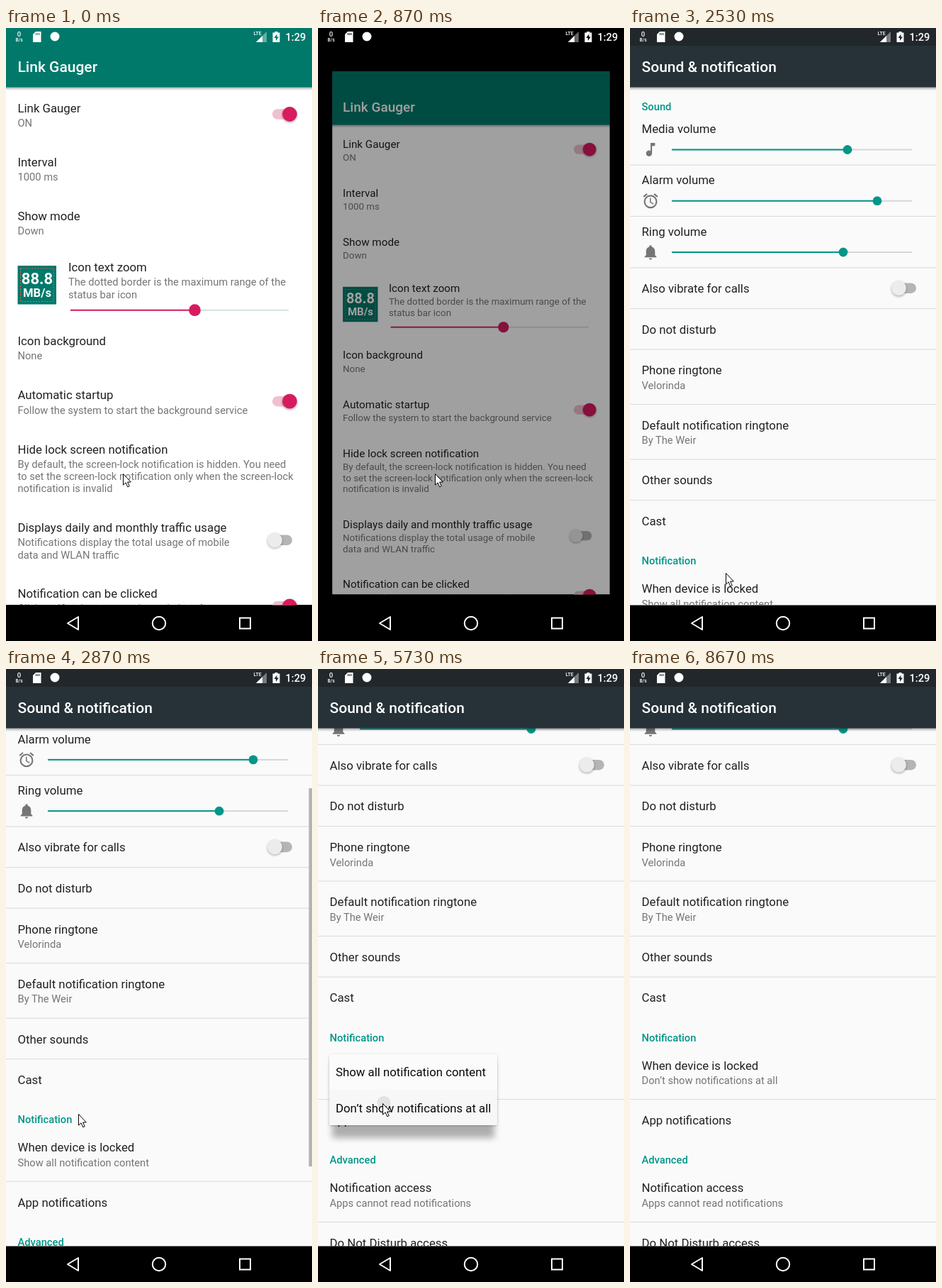
An HTML page that plays this animation: 432x864 px, repeating every 9790 ms.

```html
<!DOCTYPE html>
<html lang="en">
<head>
<meta charset="utf-8">
<title>Settings walkthrough</title>
<style>
  html, body { margin: 0; width: 100%; height: 100%; overflow: hidden; background: #000; }
  svg { display: block; width: 432px; height: 864px; font-family: Roboto, sans-serif; }
</style>
</head>
<body>
<script>
const LOOP = 9790, FPS = 15;
const DARK = '#212121', GREY = '#757575', PINK = '#d81b60', TEAL = '#009688', GREEN = '#00796b';

// ---- drawing helpers; text is placed by the middle of its capitals ----
const text = (s, x, y, size = 16.8, fill = DARK, extra = '') =>
  `<text x="${x}" y="${y + size * .3555}" font-size="${size}" fill="${fill}" ${extra}>${s}</text>`;
const title = (s, y, x = 16.5) => text(s, x, y);
const note = (s, y, x = 16.5, id = '') => text(s, x, y, 14.7, GREY, id && `id="${id}"`);
const bold = (s, x, y, size, fill, extra = '') => text(s, x, y, size, fill, 'font-weight="500" ' + extra);
const rect = (x, y, w, h, fill, extra = '') =>
  `<rect x="${x}" y="${y}" width="${w}" height="${h}" fill="${fill}" ${extra}/>`;
const dot = (x, y, r, fill, extra = '') => `<circle cx="${x}" cy="${y}" r="${r}" fill="${fill}" ${extra}/>`;
const path = (d, fill, extra = '') => `<path d="${d}" fill="${fill}" ${extra}/>`;
const category = (s, y) => bold(s, 16.5, y, 14.7, TEAL);
const divider = y => rect(0, y - .5, 432, 1.1, '#dcdcdc');

const toggle = (y, on) => {
  const x = on ? 400.5 : 379.5;
  return rect(376, y - 7.3, 28, 14.6, on ? '#f0bfd0' : '#b5b5b5', 'rx="7.3"') +
    dot(x, y + 1.3, 10.8, '#000', 'opacity=".25" filter="url(#soft)"') +
    dot(x, y, 10.4, on ? PINK : '#ececec');
};

const slider = (x0, x1, x, y, r, fill, rest) =>
  rect(x0, y - 1, x1 - x0, 2, rest) + rect(x0, y - 1, x - x0, 2, fill) + dot(x, y, r, fill);

const header = (s, bar, status) =>
  rect(0, 83, 432, 5, 'url(#shade)') + rect(0, 0, 432, 83.5, bar) + rect(0, 0, 432, 25, status) +
  bold(s, 16.5, 55, 21, '#fff');

const volume = (s, y, x, icon) =>
  title(s, y) + slider(59, 398, x, y + 29.3, 6.4, TEAL, '#d6d6d6') +
  path(icon, GREY, `transform="translate(16.4 ${y + 16.7}) scale(1.05)"`);

const NOTE = 'M12 3v10.55c-.59-.34-1.27-.55-2-.55-2.21 0-4 1.79-4 4s1.79 4 4 4 4-1.79 4-4V7h4V3z';
const ALARM = 'M22 5.72l-4.6-3.86-1.29 1.53 4.6 3.86zM7.88 3.39L6.6 1.86 2 5.71l1.29 1.53zM12.5 8H11v6l4.75 2.85.75-1.23-4-2.37z' +
  'M12 4a9 9 0 1 0 0 18a9 9 0 1 0 0-18zm0 16a7 7 0 1 1 0-14a7 7 0 1 1 0 14z';
const BELL = 'M12 22c1.1 0 2-.9 2-2h-4c0 1.1.89 2 2 2zm6-6v-5c0-3.07-1.64-5.64-4.5-6.32V4a1.5 1.5 0 0 0-3 0v.68C7.63 5.36 6 7.92 6 11v5l-2 2v1h16v-1z';

const appPage = rect(0, 0, 432, 813, '#fff') +
  rect(0, 569, 432, 101, '#000', 'id="press" opacity="0"') +
  title('Link Gauger', 113) + note('ON', 134) + toggle(121.5, true) +
  title('Interval', 189) + note('1000 ms', 210) +
  title('Show mode', 265) + note('Down', 286) +
  rect(16.5, 335, 54.5, 54.5, GREEN) +
  rect(20.5, 339, 46.5, 46.5, 'none', 'stroke="#e0664e" stroke-dasharray="2 2"') +
  text('88.8', 44, 353, 22, '#fff', 'font-weight="700" text-anchor="middle"') +
  text('MB/s', 44, 373, 16.6, '#fff', 'font-weight="700" text-anchor="middle"') +
  title('Icon text zoom', 337, 88) +
  note('The dotted border is the maximum range of the', 358, 88) + note('status bar icon', 375.5, 88) +
  slider(91, 399, 266.5, 397.7, 8.4, PINK, '#d3e2df') +
  title('Icon background', 441) + note('None', 462) +
  title('Automatic startup', 517.5) + note('Follow the system to start the background service', 538.5) + toggle(526.2, true) +
  title('Hide lock screen notification', 593.7) +
  note('By default, the screen-lock notification is hidden. You need', 614.8) +
  note('to set the screen-lock notification only when the screen-lock', 632) +
  note('notification is invalid', 649.2) +
  title('Displays daily and monthly traffic usage', 704) +
  note('Notifications display the total usage of mobile', 725) + note('data and WLAN traffic', 742.3) + toggle(721.8, false) +
  title('Notification can be clicked', 797.3) + note('Click notification to open the main interface', 818) + toggle(815, true) +
  header('Link Gauger', GREEN, GREEN);

const soundRows = category('Sound', 111) +
  volume('Media volume', 142.2, 307, NOTE) + divider(193) +
  volume('Alarm volume', 214.4, 349, ALARM) + divider(265.4) +
  volume('Ring volume', 286.7, 301, BELL) + divider(337.8) +
  title('Also vibrate for calls', 367.3) + toggle(366.7, false) + divider(395.5) +
  title('Do not disturb', 425) + divider(453) +
  title('Phone ringtone', 482.5) + note('Velorinda', 504) + divider(530.4) +
  title('Default notification ringtone', 560) + note('By The Weir', 581) + divider(608) +
  title('Other sounds', 637.4) + divider(665.5) +
  title('Cast', 695) + category('Notification', 751) +
  `<g clip-path="url(#row)">${rect(0, 761.5, 432, 76.5, '#00332e', 'id="rowTint"')}${dot(0, 0, 0, '#000', 'id="rowWave"')}</g>` +
  title('When device is locked', 790.3) + note('', 811.3, 16.5, 'choice') + divider(838) +
  title('App notifications', 867.5) + category('Advanced', 923.5) +
  title('Notification access', 963) + note('Apps cannot read notifications', 984.5) + divider(1011) +
  title('Do Not Disturb access', 1041);

const popup = rect(20, 554, 0, 0, '#000', 'id="drop" opacity=".3" filter="url(#deep)"') +
  rect(16.5, 544, 0, 0, '#000', 'id="edge" opacity=".3" filter="url(#soft)"') +
  `<g clip-path="url(#box)">${rect(16, 543, 237, 100, '#fbfbfb')}<g id="items">` +
  rect(16, 593, 237, 50, '#000', 'id="itemTint"') + dot(93, 611.5, 0, '#000', 'id="itemWave"') +
  text('Show all notification content', 25, 568.5, 16.8, '#0a0a0a') +
  text('Don’t show notifications at all', 25, 619, 16.8, '#0a0a0a') + '</g></g>';

const systemBars =
  bold('0', 18.5, 8.5, 9.5, '#fff', 'text-anchor="middle"') + bold('B/s', 18.5, 16.5, 6.5, '#fff', 'text-anchor="middle"') +
  path('M42 5h7.5v15H38V9zM42 7v3h1V7zm2.2 0v3h1V7zm2.2 0v3h1V7z', '#fff', 'fill-rule="evenodd"') +
  dot(69, 12, 6.5, '#fff') +
  bold('LTE', 349.5, 8, 7, '#fff') +
  path('M353 20h15V5z', '#fff', 'opacity=".4"') + path('M353 20h9v-9z', '#fff') +
  path('M379.5 5h4v1.5h3V20h-10V6.500h3zM382.500 8.500l-4 5.500h2.500v4l4-5.500h-2.500z', '#fff', 'fill-rule="evenodd"') +
  bold('1:29', 394.5, 13, 14.7, '#fff') +
  '<g fill="none" stroke="#fff" stroke-width="2" stroke-linejoin="round">' +
  '<path d="M87 839l15-9v18z"/><circle cx="216" cy="839" r="9.2"/><path d="M330 831.500h15v15h-15z" stroke-linejoin="miter"/></g>';

const blur = (id, s) => `<filter id="${id}" x="-30%" y="-30%" width="160%" height="160%"><feGaussianBlur stdDeviation="${s}"/></filter>`;
const clip = (id, x, y, w, h, rid = '') => `<clipPath id="${id}">${rect(x, y, w, h, '#000', rid && `id="${rid}"`)}</clipPath>`;

document.body.innerHTML = `<svg viewBox="0 0 432 864"><defs>
  ${blur('soft', 1.4)}${blur('deep', 5)}
  ${clip('screen', 0, 0, 432, 813.5)}${clip('row', 0, 761.5, 432, 76.5)}${clip('box', 16, 543, 0, 0, 'boxSize')}
  <linearGradient id="shade" x2="0" y2="1"><stop stop-opacity=".35"/><stop offset="1" stop-opacity="0"/></linearGradient></defs>
  ${rect(0, 0, 432, 864, '#000')}
  <g id="app" clip-path="url(#screen)">${appPage}</g>
  <g id="sound" clip-path="url(#screen)">${rect(0, 0, 432, 814, '#fafafa')}<g id="list">${soundRows}</g>
    ${header('Sound &amp; notification', '#263238', '#21272b')}
    ${rect(427.5, 83.5, 4.5, 533, '#b3b3b3', 'id="thumb"')}<g id="popup">${popup}</g></g>
  ${systemBars}
  <path id="cursor" d="M.5.5v15.600l3.600-3.300 2.600 6 2.500-1.100-2.600-5.700h4.700z" fill="#fff" stroke="#000"/></svg>`;

// ---- motion ----
const get = id => document.getElementById(id);
const set = (id, attrs) => { for (const k in attrs) get(id).setAttribute(k, attrs[k]); };
const part = (t, from, to) => Math.min(1, Math.max(0, (t - from) / (to - from)));
const smooth = p => p * p * (3 - 2 * p);
const out = (p, n) => 1 - (1 - p) ** n;
const show = (id, on) => set(id, { display: on ? 'inline' : 'none' });

// time, x, y of the pointer's tip
const route = [
  [0, 165, 628], [1533, 165, 628], [2200, 139, 780], [2467, 139, 780], [2533, 135, 768],
  [3000, 94, 592], [3200, 91, 584], [4133, 91, 584], [4200, 91, 587], [4467, 91, 587],
  [4733, 91, 578], [4867, 91, 578], [4933, 91, 576], [5333, 91, 612], [6133, 91, 612],
  [6333, 103, 690], [6733, 46, 866], [7933, 43, 866], [8000, 43, 850], [8267, 91, 842],
  [8533, 91, 842], [8667, 85, 866], [LOOP, 85, 866]
];

function pointer(t) {
  const i = route.findIndex(k => k[0] > t), [t0, x0, y0] = route[i - 1], [t1, x1, y1] = route[i];
  const p = smooth(part(t, t0, t1));
  return [x0 + (x1 - x0) * p, y0 + (y1 - y0) * p];
}

function draw(t) {
  // first page sinks back and dims, second page slides up over it
  const back = out(part(t, 688, 1121), 5), scale = 1 - .1 * back;
  show('app', t < 1330);
  set('app', {
    opacity: 1 - .4 * back,
    transform: `translate(216 ${432 + 22.3 * back}) scale(${scale}) translate(-216 -432)`
  });
  set('press', { opacity: t >= 598 && t < 730 ? .07 : 0 });
  show('sound', t > 867);
  set('sound', { transform: `translate(0 ${950 * (1 - part(t, 867, 1267)) ** 5})` });

  // scrolling and its fading bar
  const scroll = 231.5 * smooth(part(t, 2533, 3200));
  set('list', { transform: `translate(0 ${-scroll})` });
  set('thumb', {
    y: 83.5 + scroll * .73,
    opacity: t < 2570 ? 1 - part(t, 1467, 1733) : 1 - part(t, 3450, 3680)
  });

  // pressed row
  const wave = part(t, 3467, 3733), fade = 1 - part(t, 3740, 3867);
  set('rowTint', { opacity: t >= 3466 ? .045 * fade : 0 });
  set('rowWave', { cx: 91 + 31 * wave, cy: 816.5, r: 8 + 48 * wave, opacity: t >= 3466 ? .04 * fade : 0 });
  get('choice').textContent = t < 5790 ? 'Show all notification content' : 'Don’t show notifications at all';

  // drop-down list grows, its content kept centred
  const p = part(t, 3600, 3850), e = out(p, 2);
  const w = 237 * (.284 + .716 * e), h = 100 * (.495 + .505 * e);
  show('popup', p > 0 && t < 5999);
  set('popup', { opacity: Math.min(1, p * 4) * (1 - part(t, 5800, 6000)) });
  set('boxSize', { width: w, height: h });
  set('edge', { width: w - 1, height: h - .5 });
  set('drop', { width: w - 8, height: h + 7 });
  set('items', { transform: `translate(${(w - 237) / 2} ${(h - 100) / 2})` });
  const tapped = t >= 5730;
  set('itemTint', { opacity: tapped ? .015 : 0 });
  set('itemWave', { r: 9.5 + Math.max(0, t - 5733) * .35, opacity: tapped ? .08 : 0 });

  set('cursor', { transform: `translate(${pointer(t).map(Math.round)})` });
}

function tick() {
  const t = performance.now() % LOOP;
  draw(Math.floor((t + 4) * FPS / 1000) * 1000 / FPS);
  requestAnimationFrame(tick);
}
tick();
</script>
</body>
</html>
```
